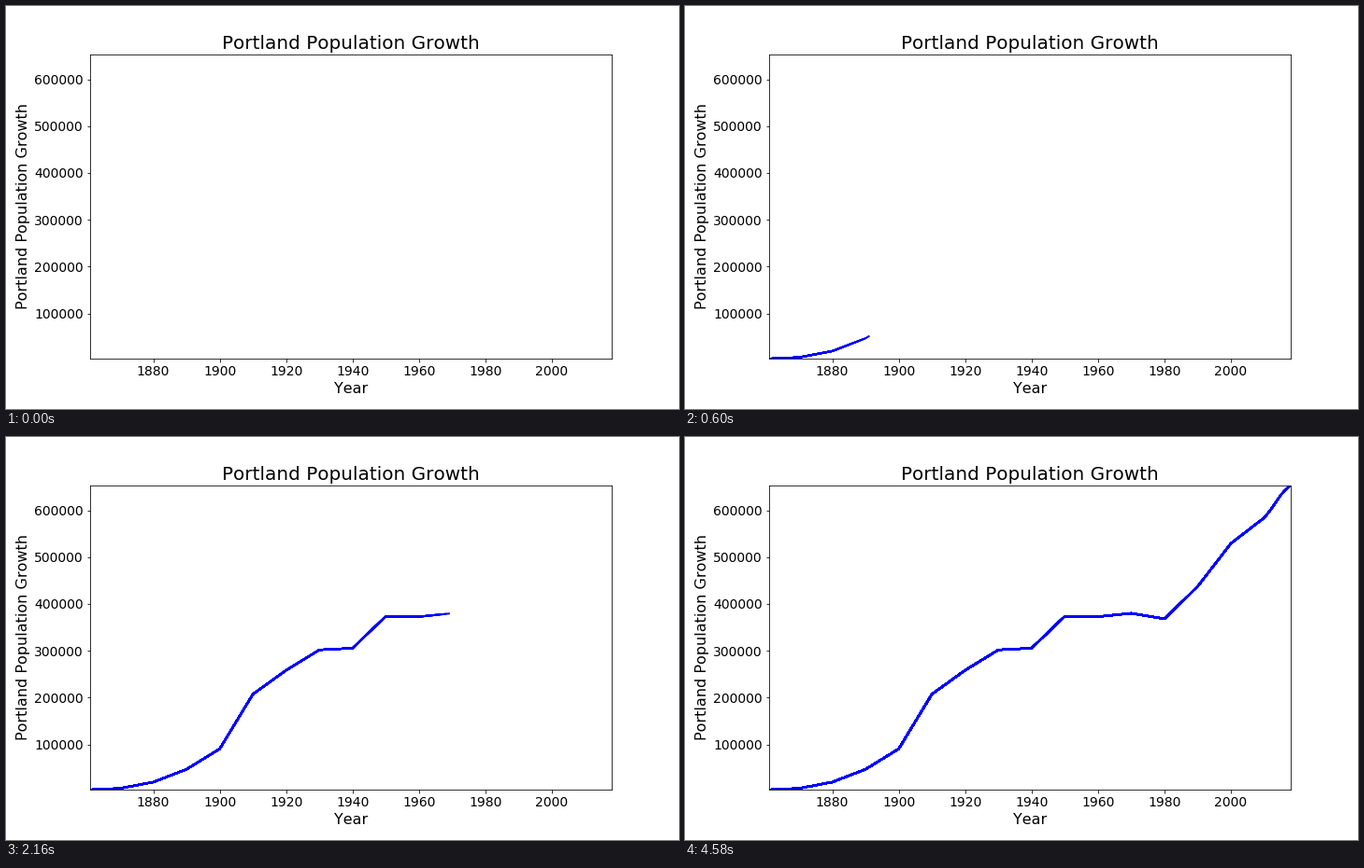
A matplotlib script that plays this animation: 720x432 px, repeating every 4600 ms.

```python
import numpy as np
import matplotlib.pyplot as plt
from matplotlib.animation import FuncAnimation
from matplotlib.collections import LineCollection
from matplotlib.patches import Rectangle

STEPS = 10          # interpolated points between two entries
FLASH_FRAME = 1     # the single dark frame near the start
LOW, HIGH = 3416, 653115
TITLE = "Portland Population Growth"


def early_growth(decade):
    """Thousands of people from 1860 (0) to 1900 (4), speeding up."""
    return 2.9 + 87.5 * (decade / 4) ** 2.4


def late_growth(year):
    """Thousands added since 2010: a steady rise with a gentle wave."""
    turn = np.pi * year / 8
    return 8.667 * year + 3.6 * np.sin(turn) - 2.3 * np.sin(2 * turn)


def growth_points():
    """Entries per decade, then per year, each split into equal steps."""
    middle = [207.2, 258.3, 301.8, 305.4, 373.6, 372.7,
              380, 368.1, 437.3, 529.1, 583.8]
    years = np.r_[1860:2011:10, 2011:2019]
    people = 1000 * np.r_[early_growth(np.arange(5)), middle,
                          middle[-1] + late_growth(np.arange(1, 9))]
    entry = np.arange(len(years))
    pos = np.arange(1, entry[-1] * STEPS + 1) / STEPS
    return np.column_stack([np.interp(pos, entry, years),
                            np.interp(pos, entry, people)])


plt.rcParams["font.family"] = "DejaVu Sans"
plt.rcParams["text.kerning_factor"] = 6   # whole-pixel kerning
points = growth_points()

fig = plt.figure(figsize=(10, 6), dpi=72, facecolor="white")
fig.subplots_adjust(left=0.125, right=0.9, bottom=0.125, top=0.88)
back = fig.add_artist(Rectangle((0, 0), 1, 1, transform=fig.transFigure,
                                color="white", zorder=-1))

ax = fig.add_subplot(facecolor="none")
ax.set_xlim(points[0, 0], points[-1, 0])
ax.set_ylim(LOW, HIGH)
ax.set_xticks(range(1880, 2001, 20))
ax.set_yticks(range(100000, 600001, 100000))
ax.tick_params(labelsize=14)
ax.set_xlabel("Year", fontsize=16)
ax.set_ylabel(TITLE, fontsize=16)
ax.set_title(TITLE, fontsize=20)

curve = LineCollection([], colors="blue", linewidths=2, zorder=2,
                       capstyle="projecting", joinstyle="round")
ax.add_collection(curve, autolim=False)


def update(i):
    # Every step draws one longer line over all earlier ones,
    # so the older part grows solid while the tip stays thin.
    curve.set_segments([points[:n + 1] for n in range(1, i + 1)])
    flash = i == FLASH_FRAME
    back.set_color("#262626" if flash else "white")
    curve.set_color("#00000d" if flash else "blue")
    return back, curve


anim = FuncAnimation(fig, update, frames=len(points), interval=20,
                     repeat=True, repeat_delay=0, blit=False)
plt.show()
```
